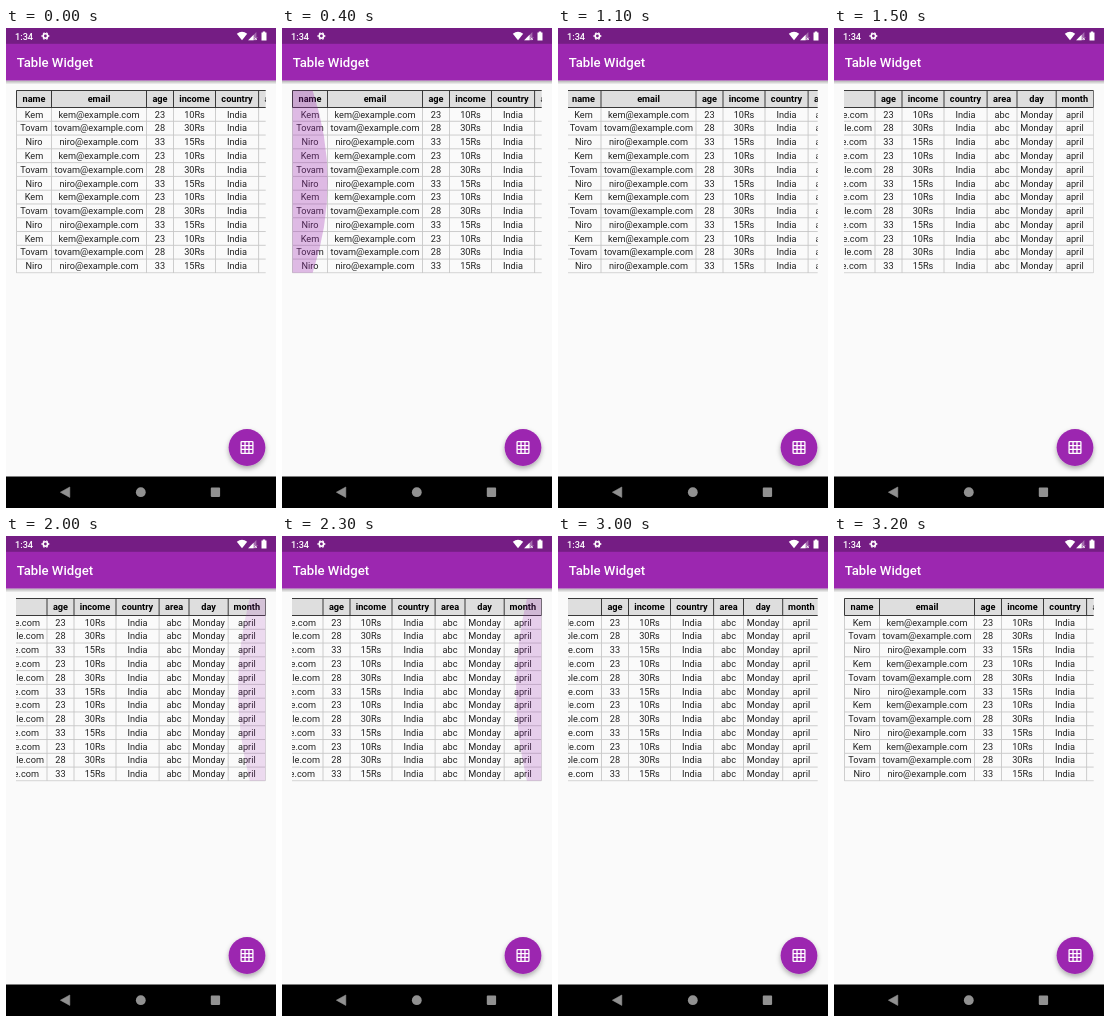
An HTML page for the animation above (3.5 s loop, 270 by 480 pixels).

```html
<!DOCTYPE html>
<html lang="en">
<head>
<meta charset="utf-8">
<title>Table Widget</title>
<style>
  html, body { margin: 0; width: 100%; height: 100%; overflow: hidden; background: #fafafa; }
  svg { display: block; width: 100vw; height: 100vh; }
  text { font-family: Roboto, sans-serif; font-size: 9.19px; }
  .head text { font-weight: 700; fill: #000; }
  .body text { fill: #212121; }
  .head path { stroke: #303030; stroke-width: .95; fill: none; }
  .body path { stroke: #c4c4c4; stroke-width: .85; fill: none; }
  #table text { text-anchor: middle; }
</style>
</head>
<body>
<svg viewBox="0 0 270 480" xmlns="http://www.w3.org/2000/svg">
  <defs>
    <clipPath id="view"><rect x="10" y="62" width="249.7" height="183.4"/></clipPath>
    <linearGradient id="shade" x2="0" y2="1">
      <stop offset="0" stop-color="#000" stop-opacity=".3"/>
      <stop offset="1" stop-color="#000" stop-opacity="0"/>
    </linearGradient>
    <filter id="lift" x="-40%" y="-40%" width="180%" height="190%">
      <feDropShadow dx="0" dy="2.6" stdDeviation="2.4" flood-color="#000" flood-opacity=".32"/>
    </filter>
  </defs>
  <rect width="270" height="480" fill="#fafafa"/>

  <g clip-path="url(#view)">
    <g id="table"></g>
    <path id="glowLeft" fill="#9c27b0"/>
    <path id="glowRight" fill="#9c27b0"/>
  </g>

  <rect y="52.5" width="270" height="4" fill="url(#shade)"/>
  <rect width="270" height="52.5" fill="#9c27b0"/>
  <rect width="270" height="15.8" fill="#751d84"/>
  <text x="10.8" y="38.7" fill="#fff" style="font-size:13.13px;font-weight:500">Table Widget</text>

  <g fill="#fff">
    <text x="9" y="11.6" style="font-weight:500">1:34</text>
    <g fill="none" stroke="#fff">
      <circle cx="39.4" cy="8" r="2.2" stroke-width="1.6"/>
      <circle cx="39.4" cy="8" r="3.3" stroke-width="1.2" pathLength="12" stroke-dasharray="1 1" stroke-dashoffset=".5"/>
    </g>
    <path d="M230.8 5.7Q236 1.8 241.2 5.7L236 12.2Z"/>
    <path d="M250.4 4V12.2H242.2Z" opacity=".35"/>
    <path d="M247.6 6.8V12.2H242.2Z"/>
    <path d="M256.8 3.6h2.4v.9h1.3v7.9h-5v-7.9h1.3z"/>
  </g>
  <path d="M248.5 9.6l2.4 2.4m0-2.4l-2.4 2.4" stroke="#fff" stroke-width=".8"/>

  <circle cx="241" cy="419.5" r="18.4" fill="#9c27b0" filter="url(#lift)"/>
  <g transform="translate(241 419.5) scale(.656)" fill="none" stroke="#fff" stroke-width="2">
    <rect x="-9" y="-9" width="18" height="18" rx="1"/>
    <path d="M-3-9V9M3-9V9M-9-3H9M-9 3H9"/>
  </g>

  <rect y="448.5" width="270" height="31.5" fill="#000"/>
  <g fill="#919191">
    <path d="M54.4 464.2L63.8 459V469.4Z" stroke="#919191" stroke-width=".6" stroke-linejoin="round"/>
    <circle cx="134.8" cy="464.2" r="4.9"/>
    <rect x="204.8" y="459.6" width="9.3" height="9.3" rx=".8"/>
  </g>
</svg>

<script>
const LOOP = 3500, STEP = 100;
const LEFT = 10.5, RIGHT = 259.5, TOP = 62.5, HEAD_H = 17, ROW_H = 13.78, ROWS = 12;
const BOTTOM = TOP + HEAD_H + ROWS * ROW_H;
const edges = [10.5, 45.5, 140.5, 167.5, 209.5, 252.6, 282.5, 321.7, 359];
const MAX_SCROLL = edges[8] - RIGHT;
const titles = ['name', 'email', 'age', 'income', 'country', 'area', 'day', 'month'];
const people = [
  ['Kem', 'kem@example.com', 23, '10Rs'],
  ['Tovam', 'tovam@example.com', 28, '30Rs'],
  ['Niro', 'niro@example.com', 33, '15Rs']
];
const $ = id => document.getElementById(id);

function row(cells, y, h) {
  const lines = edges.map(x => `M${x} ${y}v${h}`).join('');
  const labels = cells.map((label, i) =>
    `<text x="${(edges[i] + edges[i + 1]) / 2}" y="${y + h / 2 + 3.3}">${label}</text>`).join('');
  return `<path d="${lines}M${edges[0]} ${y + h}H${edges[8]}"/>${labels}`;
}

function buildTable() {
  let body = '';
  for (let i = 0; i < ROWS; i++) {
    const cells = [...people[i % 3], 'India', 'abc', 'Monday', 'april'];
    body += row(cells, TOP + HEAD_H + i * ROW_H, ROW_H);
  }
  $('table').innerHTML = `<g class="body">${body}</g><g class="head">
    <rect x="${LEFT}" y="${TOP}" width="${edges[8] - LEFT}" height="${HEAD_H}" fill="#dedede"/>
    <path d="M${LEFT} ${TOP}H${edges[8]}"/>${row(titles, TOP, HEAD_H)}</g>`;
}

const clamp = v => Math.min(1, Math.max(0, v));

// Piecewise linear interpolation over [time, value] pairs.
function track(t, keys) {
  const i = keys.findIndex(k => k[0] >= t);
  if (i < 0) return keys[keys.length - 1][1];
  if (i === 0) return keys[0][1];
  const [t0, a] = keys[i - 1], [t1, b] = keys[i];
  return a + (b - a) * (t - t0) / (t1 - t0);
}

const scrollKeys = [
  [1000, 0], [1100, 2.5], [1200, MAX_SCROLL],
  [2900, MAX_SCROLL], [3000, MAX_SCROLL - 2.5], [3100, 35], [3200, 0]
];

// Overscroll arc: swells from start to release, then recedes with deceleration.
function drawGlow(el, t, { start, release, x, dir, strength }) {
  const pull = clamp((t - start) / (release - start));
  const rest = (1 - clamp((t - release) / 600)) ** 2;
  const size = (1 - (1 - pull) ** 2) * rest;
  const span = BOTTOM - TOP, radius = span * 1.5;
  const depth = radius * (1 - Math.sqrt(3) / 2);
  const side = Math.sqrt(radius ** 2 - (span / 2) ** 2) - radius + depth;
  const near = x + dir * side * size;
  const far = x + dir * (2 * depth - side) * size;
  el.setAttribute('d', `M${x} ${TOP}H${near}Q${far} ${(TOP + BOTTOM) / 2} ${near} ${BOTTOM}H${x}Z`);
  el.setAttribute('opacity', strength * pull * rest);
}

const leftPull = { start: 0, release: 500, x: LEFT, dir: 1, strength: .38 };
const rightPull = { start: 1800, release: 2200, x: RIGHT, dir: -1, strength: .3 };

function render(time) {
  const t = Math.floor((time % LOOP) / STEP) * STEP;
  $('table').setAttribute('transform', `translate(${-track(t, scrollKeys)} 0)`);
  drawGlow($('glowLeft'), t, leftPull);
  drawGlow($('glowRight'), t, rightPull);
}

buildTable();
const began = performance.now();
function tick() {
  render(performance.now() - began);
  requestAnimationFrame(tick);
}
tick();
</script>
</body>
</html>
```
